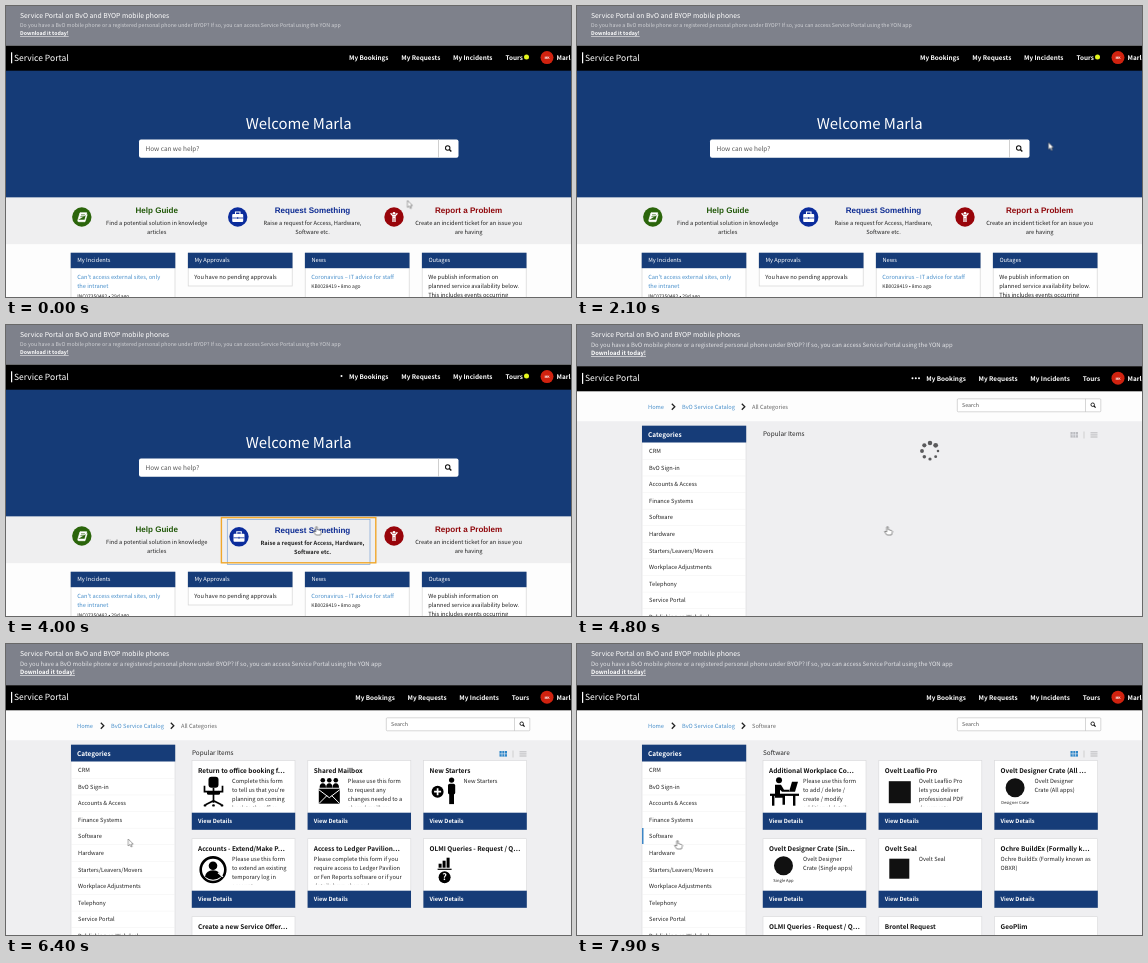
These frames come from a looping animation (565x291 px, 8 s). An HTML page:

```html
<!DOCTYPE html>
<html lang="en">
<head>
<meta charset="utf-8">
<title>Service Portal</title>
<style>
  html, body { margin: 0; width: 100%; height: 100%; overflow: hidden; background: #fff; }
  #stage { display: block; width: 100vw; height: 100vh; }
  text {
    font-family: "Noto Sans CJK JP", "Noto Sans CJK SC", "Noto Sans CJK", Lato, sans-serif;
    text-rendering: geometricPrecision; white-space: pre;
  }
  .arial { font-family: "Liberation Sans", Arial, sans-serif; }
  .timed { animation: 8s step-end infinite; }
  .spinner { transform-origin: 353px 126px; animation: spin .8s steps(8) infinite; }
  .cursor { animation: travel 8s ease-in-out infinite; }
  @keyframes spin { to { transform: rotate(360deg); } }
  @keyframes travel {
    0%, 8% { transform: translate(401.5px, 194.5px); }
    22%, 31% { transform: translate(471.5px, 136.5px); }
    42.5%, 63.5% { transform: translate(310.5px, 201px); }
    69%, 71% { transform: translate(270px, 188px); }
    83%, 100% { transform: translate(100.5px, 196px); }
  }
</style>
</head>
<body>
<svg id="stage" viewBox="0 0 565 291" preserveAspectRatio="none"></svg>
<script>
const LOOP = 8000;
const HOVER = 3300, CLICK = 3700, OPEN = 4400, LOADED = 5100, PICK = 6500, FILTERED = 7700;
const NAVY = '#163c78', LINK = '#4a90cb', INK = '#222';
const SMALL = 5.7, TITLE = 6.45;
const range = n => [...Array(n).keys()];
let rules = '', windows = 0;

// Shows its content only between the given pairs of times.
function during(spans, content) {
  const name = 'show' + windows++;
  const steps = spans.map(([from, to]) =>
    `${from / LOOP * 100}%{opacity:1}${to / LOOP * 100}%{opacity:0}`).join('');
  rules += `@keyframes ${name}{0%{opacity:0}${steps}}`;
  return `<g class="timed" style="animation-name:${name}">${content}</g>`;
}

const text = (x, y, value, size = SMALL, fill = INK, attrs = '') =>
  `<text x="${x}" y="${y}" font-size="${size}" fill="${fill}" ${attrs}>${value.replace(/&/g, '&amp;')}</text>`;
const bold = (x, y, value, size = TITLE, fill = '#111', attrs = '') =>
  text(x, y, value, size, fill, 'font-weight="700" ' + attrs);
const lines = (x, y, list, fill = INK, step = 9) =>
  list.map((line, i) => text(x, y + i * step, line, SMALL, fill)).join('');
const rect = (x, y, w, h, fill, attrs = '') =>
  `<rect x="${x}" y="${y}" width="${w}" height="${h}" fill="${fill}" ${attrs}/>`;
const circle = (x, y, r, fill, attrs = '') =>
  `<circle cx="${x}" cy="${y}" r="${r}" fill="${fill}" ${attrs}/>`;
const path = (d, fill = 'none', stroke = 'none', width = 1) =>
  `<path d="${d}" fill="${fill}" stroke="${stroke}" stroke-width="${width}"/>`;
const at = (x, y, content) => `<g transform="translate(${x} ${y})">${content}</g>`;
const magnifier = (x, y, s) => at(x, y, `<g transform="scale(${s})">` +
  circle(-.6, -.6, 2.2, 'none', 'stroke="#111" stroke-width="1.1"') + path('M1 1 3 3', 'none', '#111', 1.4) + '</g>');
const dot = (x, y) => circle(x, y, 1, '#fff');

function header(top, dx, noteSize, noteFill, noteY, linkY) {
  const y = top + 14.3;
  const nav = [[343, 'My Bookings'], [395.3, 'My Requests'], [447, 'My Incidents'], [499.5, 'Tours']];
  return rect(0, 0, 565, top, '#7e818b') + rect(0, top, 565, 25.1, '#000') +
    text(14, 12, 'Service Portal on BvO and BYOP mobile phones', 6.8, '#fff') +
    text(14, noteY, 'Do you have a BvO mobile phone or a registered personal phone under BYOP? If so, you can access Service Portal using the YON app', noteSize, noteFill) +
    bold(14, linkY, 'Download it today!', noteSize - .08, '#fff', 'text-decoration="underline"') +
    rect(5, top + 6.7, 1.2, 11, '#fff') + text(8, y + .8, 'Service Portal', 8.5, '#fff') +
    nav.map(([x, label]) => bold(x + dx, y, label, 6.35, '#fff')).join('') +
    circle(541, top + 12, 6.5, '#d0220f') + bold(541, top + 13.5, 'MK', 3.4, '#fff', 'text-anchor="middle"') +
    bold(550.5, y, 'Marla Kestow', 6.35, '#fff');
}

function homePage() {
  const middle = 'text-anchor="middle"';
  const tile = (x, title, color, first, second, weight = text) =>
    `<text class="arial" x="${x}" y="206.6" font-size="8.05" font-weight="700" fill="${color}" ${middle}>${title}</text>` +
    weight(x, 218.7, first, SMALL, INK, middle) + weight(x, 228, second, SMALL, INK, middle);
  const briefcase = circle(231.7, 211, 9.7, '#0b2c9c') +
    rect(226.2, 208, 11, 8, '#fff', 'rx="1"') + path('M229.5 208v-2h4.5v2', 'none', '#fff', 1.1) +
    path('M226.2 212h11M231.7 211v2', 'none', '#0b2c9c', .8);
  const request = weight => tile(306.5, 'Request Something', '#0d2b92', 'Raise a request for Access, Hardware,', 'Software etc.', weight);
  const panel = (x, title, bottom) => rect(x, 247.5, 104, bottom - 247.5, '#fff', 'stroke="#d5d5d5" stroke-width=".7"') +
    rect(x - .3, 246.7, 104.6, 15.5, NAVY) + text(x + 6.2, 256.3, title, SMALL, '#fff', 'font-weight="500"');

  return rect(0, 0, 565, 291, '#fdfdfd') + rect(0, 64, 565, 127.6, '#153b77') +
    header(39.6, 0, 5.28, '#d2d3d7', 21, 29) + circle(520.5, 51, 2.5, '#e4f51d') +
    text(292.7, 122.8, 'Welcome Marla', 14.9, '#fff', middle) +
    rect(133, 133.5, 319.5, 18.3, '#fff', 'rx="2"') + rect(432, 133.5, .7, 18.3, '#bbb') +
    text(139.5, 145.2, 'How can we help?', 6.45, '#555') + magnifier(442.3, 142.6, 1) +
    rect(0, 191.6, 565, 46.6, '#efeff0') +
    circle(75.8, 211, 9.7, '#2b650b') +
    path('M74 206.8h6.8l-2 7.3h-6.9zM71.9 214.1q-.5 1.6.9 1.6h6.2l2.2-7.2', '#fff', '#fff', .7) +
    path('M75 208.8h3.9M74.4 210.7h3.9', 'none', '#2b650b', .7) +
    tile(150.7, 'Help Guide', '#22590a', 'Find a potential solution in knowledge', 'articles') +
    circle(388, 211, 9.7, '#98040a') + circle(388, 207.3, 1.4, '#fff') +
    path('M384.6 207.2 386.7 209.6H389.3L391.4 207.2M387 209.6V216M389 209.6V216M387 211.4H389', 'none', '#fff', 1.3) +
    tile(462.6, 'Report a Problem', '#8f060a', 'Create an incident ticket for an issue you', 'are having') +
    during([[0, HOVER]], briefcase + request(text)) +
    during([[HOVER, OPEN]], at(1.3, .8, briefcase) + at(0, 1, request(bold))) +
    during([[CLICK, OPEN]],
      rect(221.3, 194.5, 142.7, 45, 'none', 'stroke="#7ba4d8" stroke-width=".7"') +
      rect(215.4, 192.6, 154.4, 45.2, 'none', 'stroke="#f0a72b" stroke-width="1.4"')) +
    panel(65, 'My Incidents', 300) + lines(71.2, 273.2, ["Can't access external sites, only", 'the intranet'], LINK) +
    text(71.2, 291.6, 'INC07350482 • 29d ago', 4.95) +
    panel(182.2, 'My Approvals', 280) + text(188.2, 273.2, 'You have no pending approvals') +
    panel(299.2, 'News', 300) + text(305.2, 273.2, 'Coronavirus – IT advice for staff', SMALL, LINK) +
    text(305.2, 282.2, 'KB0028419 • 8mo ago', 4.95) +
    panel(416.2, 'Outages', 300) +
    lines(422.2, 273.2, ['We publish information on', 'planned service availability below.', 'This includes events occurring']) +
    [335.5, 332, 328.5].map((x, i) => during([[3900 + i * 200, OPEN]], dot(x, 51))).join('');
}

// Icons are drawn inside a 30 x 31 box.
const person = (x, y, s) => at(x, y, `<g transform="scale(${s})">` + circle(0, 2, 2.2, '#000') +
  rect(-3, 5, 6, 9, '#000', 'rx="1.5"') + rect(-2, 12, 4, 10, '#000') + '</g>');
const icons = {
  chair: rect(10.5, 0, 10, 11, '#000', 'rx="3"') + rect(9, 14, 13, 4, '#000', 'rx="1.5"') +
    path('M6.5 9v6h4M24.5 9v6h-4M15.5 11v15M7.5 28l8-4 8 4', 'none', '#000', 1.7) +
    [7, 15.5, 24].map(x => circle(x, 29, 1.4, '#000')).join(''),
  mailbox: [9, 15.5, 22].map(x => circle(x, 3.5, 2.3, '#000') + path(`M${x - 3.2} 11q0-4.5 3.2-4.5t3.2 4.5z`, '#000')).join('') +
    rect(5, 12, 21, 15, '#000') + path('M5 13l10.5 8L26 13M5 27l8-8M26 27l-8-8', 'none', '#fff', 1),
  starter: circle(8, 15, 6, '#000') + path('M8 11.5v7M4.5 15h7', 'none', '#fff', 1.7) + person(22, 1, 1.2),
  account: circle(15, 15, 12.3, '#fff', 'stroke="#000" stroke-width="2.6"') + circle(15, 11, 4.3, '#000') +
    path('M7 22q1-6.5 8-6.5t8 6.5q-8 6-16 0z', '#000') + path('M20 18l5 4', 'none', '#fff', 1.3),
  query: [4, 7, 10].map((h, i) => rect(9 + i * 4, 13 - h, 3, h, '#000')).join('') + rect(8, 14, 14, 1.2, '#000') +
    circle(15, 22.5, 6, '#000') + bold(15, 25.8, '?', 9, '#fff', 'text-anchor="middle"'),
  desk: circle(10, 3.5, 3, '#000') + path('M6 8h6l3 5h5v2h-7l-2-2v5h5v10h-2.5v-7H6z', '#000') +
    rect(1, 17, 29, 2.2, '#000') + rect(24, 18, 2.4, 11, '#000') + rect(3, 18, 2.4, 11, '#000') +
    path('M20 15l3-10h6l-3 10z', '#000'),
  square: rect(4, 4.5, 22, 22, '#111'),
  disc: label => circle(14.5, 11, 9.5, '#111') + text(14.5, 27, label, 4.1, '#222', 'text-anchor="middle"'),
  tile: rect(4.5, 4, 20, 20, '#111'),
};

function card(index, title, icon, copy) {
  const x = 186 + index % 3 * 115.8, y = 116.7 + Math.floor(index / 3) * 78;
  return rect(x, y, 103, 69, '#fff', 'stroke="#d8d8da" stroke-width=".6"') + bold(x + 6, y + 12.3, title) +
    `<svg x="${x}" y="${y + 14}" width="103" height="31.7">` +
    (icon ? at(6, 2, icon) : '') + lines(icon ? 40 : 6, 8.7, copy) + '</svg>' +
    rect(x - .2, y + 52, 103.4, 17.1, NAVY) + bold(x + 6, y + 62.7, 'View Details', SMALL, '#fff');
}
const cards = list => list.map((item, i) => card(i, ...item)).join('');

const popular = [
  ['Return to office booking f…', icons.chair, ['Complete this form', "to tell us that you're", 'planning on coming', 'back to the office']],
  ['Shared Mailbox', icons.mailbox, ['Please use this form', 'to request any', 'changes needed to a', 'shared mailbox']],
  ['New Starters', icons.starter, ['New Starters']],
  ['Accounts - Extend/Make P…', icons.account, ['Please use this form', 'to extend an existing', 'temporary log in', 'account']],
  ['Access to Ledger Pavilion…', '', ['Please complete this form if you', 'require access to Ledger Pavilion', 'or Fen Reports software or if your', 'details have changed']],
  ['OLMI Queries - Request / Q…', icons.query, []],
  ['Create a new Service Offer…', '', []],
];
const software = [
  ['Additional Workplace Co…', icons.desk, ['Please use this form', 'to add / delete /', 'create / modify', 'additional details']],
  ['Ovelt Leaflio Pro', icons.square, ['Ovelt Leaflio Pro', 'lets you deliver', 'professional PDF', 'documents']],
  ['Ovelt Designer Crate (All …', icons.disc('Designer Crate'), ['Ovelt Designer', 'Crate (All apps)']],
  ['Ovelt Designer Crate (Sin…', icons.disc('Single App'), ['Ovelt Designer', 'Crate (Single apps)']],
  ['Ovelt Seal', icons.tile, ['Ovelt Seal']],
  ['Ochre BuildEx (Formally k…', '', ['Ochre BuildEx (Formally known as', 'OBXR)']],
  ['OLMI Queries - Request / Q…', icons.query, []],
  ['Brontel Request', '', []],
  ['GeoPlim', '', []],
];

function catalogPage() {
  const categories = ['CRM', 'BvO Sign-in', 'Accounts & Access', 'Finance Systems', 'Software', 'Hardware',
    'Starters/Leavers/Movers', 'Workplace Adjustments', 'Telephony', 'Service Portal', 'Publishing on Webdesk'];
  const chevron = x => path(`M${x - 1.5} 78.8l3 3-3 3`, 'none', '#222', 1.3);
  const grid = color => rect(493.5, 107, 7.5, 5.6, color) +
    path('M496 107v5.6M498.5 107v5.6M493.5 109.8h7.5', 'none', '#efeff1', .6);
  const heading = (crumb, title) => text(175, 84, crumb, SMALL, '#666') + text(186, 111.1, title, 6.4);
  const spinner = range(8).map(i => {
    const angle = -Math.PI / 4 - i * Math.PI / 4;
    return circle(353 + 8 * Math.cos(angle), 126 + 8 * Math.sin(angle), 2.4 - i * .16, '#5a5a5c');
  }).join('');

  return rect(0, 0, 565, 291, '#efeff1') + rect(0, 66, 565, 30.2, '#fdfdfd') +
    header(41.2, 6.3, 5.95, '#e2e3e6', 21.6, 30.4) +
    text(71, 84, 'Home', SMALL, LINK) + chevron(96.3) + text(105, 84, 'BvO Service Catalog', SMALL, LINK) + chevron(166.3) +
    rect(380.3, 73.8, 143.5, 13, '#fff', 'stroke="#bbb" stroke-width=".6" rx="1"') + rect(508, 73.8, .6, 13, '#bbb') +
    text(385, 82.1, 'Search', 5.3, '#555') + magnifier(516.2, 80.2, .8) +
    rect(65, 101, 104, 200, '#fff', 'stroke="#d8d8da" stroke-width=".6"') + rect(65, 100.7, 104.2, 16.8, NAVY) +
    bold(71, 111.6, 'Categories', 6.45, '#fff') +
    categories.map((name, i) => text(72, 128.1 + i * 16.58, name) +
      rect(65, 134.2 + i * 16.58, 104, .4, '#eee')).join('') +
    during([[PICK, LOOP]], rect(65, 184, 1.5, 16, '#3d86c6')) +
    rect(506.7, 106.5, .6, 7, '#bbb') +
    [107.2, 109.3, 111.4].map(y => rect(513.5, y, 7, 1.2, '#c3c3c6')).join('') +
    during([[OPEN, FILTERED]], heading('All Categories', 'Popular Items')) +
    during([[FILTERED, LOOP]], heading('Software', 'Software')) +
    during([[OPEN, LOADED]], grid('#bbbcc0') + `<g class="spinner">${spinner}</g>`) +
    during([[LOADED, LOOP]], grid('#2e86c8')) +
    during([[LOADED, FILTERED]], cards(popular)) +
    during([[FILTERED, LOOP]], cards(software)) +
    during([[OPEN, LOADED], [7200, FILTERED]], [335.5, 338.8, 342].map(x => dot(x, 53.2)).join(''));
}

const arrow = path('M0 0V7L1.7 5.5 2.9 8 4 7.5 2.9 5.1H5z', '#fff', '#444', .5);
const hand = path('M-.8 1Q0-.3.8 1V3.6L4.2 4.6Q5 5 4.7 6.3L4 9H-.6L-3 5.7Q-2.2 4.7-.8 6z', '#fff', '#444', .6);
const handTimes = [[HOVER, 5200], [PICK, LOOP]], arrowTimes = [[0, HOVER], [5200, PICK]];

document.getElementById('stage').innerHTML =
  during([[0, OPEN]], homePage()) + during([[OPEN, LOOP]], catalogPage()) +
  `<g class="cursor">${during(arrowTimes, arrow)}${during(handTimes, hand)}</g>`;
document.head.appendChild(document.createElement('style')).textContent = rules;
</script>
</body>
</html>
```
